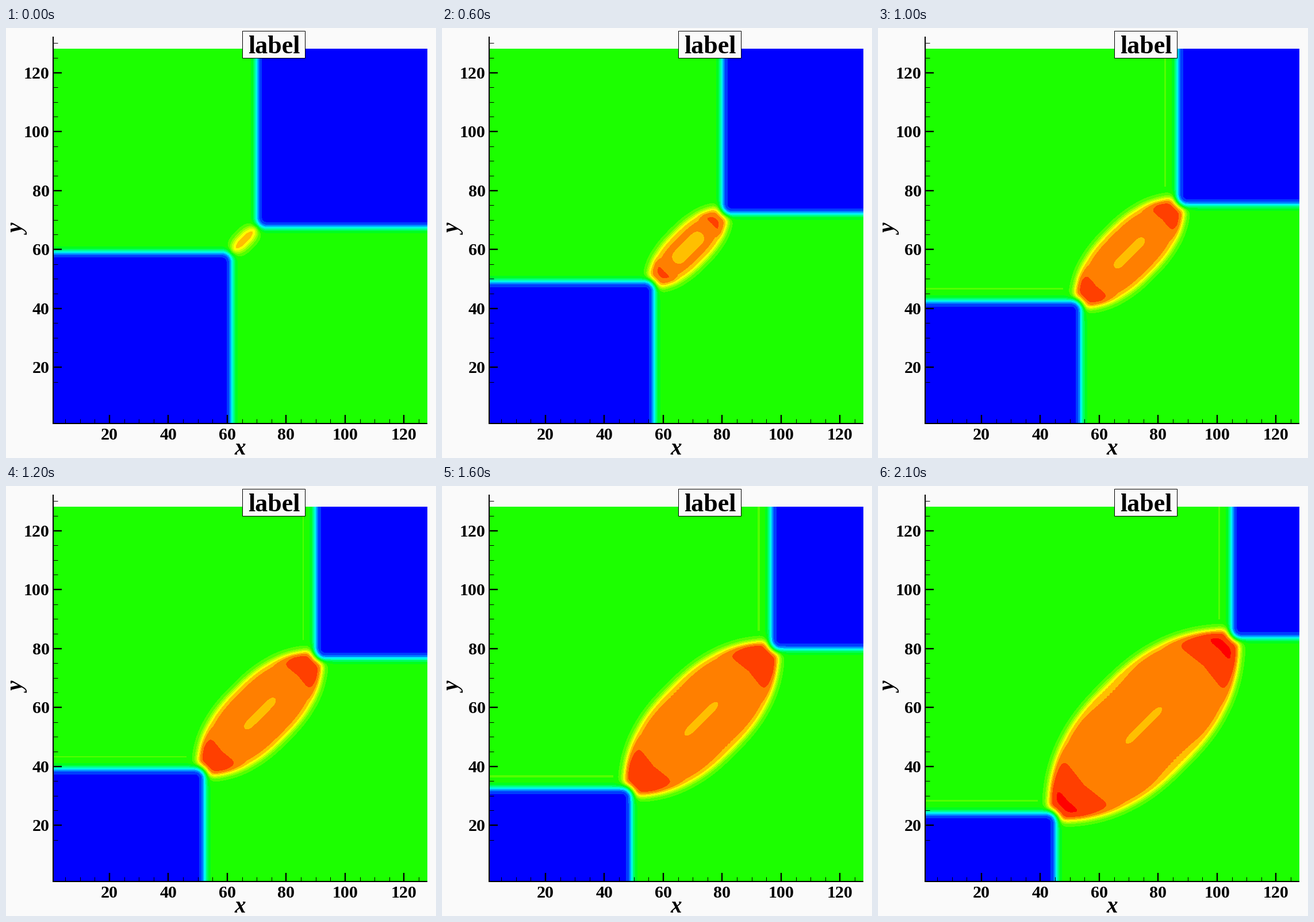
A matplotlib script that plays this animation: 748x748 px, repeating every 2.2 s.

```python
import numpy as np
import matplotlib.pyplot as plt
from matplotlib.animation import FuncAnimation
from matplotlib.colors import ListedColormap
from matplotlib.patches import Rectangle

SIZE, DPI = 748, 88
FRAMES, STEP_MS = 22, 100
LEFT, RIGHT, TOP, BOTTOM = 82, 733, 36, 688
CELL = 5.125
BANDS = 18
PAPER = "#fafafa"

X, Y = np.meshgrid(np.arange(LEFT, RIGHT) + 0.5, np.arange(TOP, BOTTOM) + 0.5)


def px(v):
    return 77.5 + CELL * v


def py(v):
    return 692.5 - CELL * v


def rainbow(n):
    """Blue, cyan, green, yellow, red in n even steps."""
    t = np.linspace(0, 1, n)
    stops = [0, 0.25, 0.5, 0.765, 1]
    return ListedColormap(np.column_stack([
        np.interp(t, stops, [0, 0, 0, 1, 1]),
        np.interp(t, stops, [0, 1, 1, 1, 0]),
        np.interp(t, stops, [1, 1, 0, 0, 0]),
    ]))


def logistic(z):
    return 0.5 * (1 + np.tanh(z / 2))


def quadrant(ex, ey, a, r=18):
    """Distance outside the rounded quadrant ex > a, ey > a."""
    qx, qy = a + r - ex, a + r - ey
    return (np.hypot(np.maximum(qx, 0), np.maximum(qy, 0))
            + np.minimum(np.maximum(qx, qy), 0) - r)


def lens(p, s, a, i):
    """Rise above the plateau inside the lens; p runs along it, s across."""
    p, s = np.asarray(p), np.asarray(s)
    p_abs, s_abs = np.abs(p), np.abs(s)
    half = 16 + 2.85 * i
    reach = a + 25 - 12 * np.exp(-i / 2)
    edge = half * (1 - (p_abs / reach) ** 2.6)
    slope = 2.6 * half / reach * (p_abs / reach) ** 1.6
    depth = (edge - s_abs) * np.sqrt(2 / (1 + slope ** 2))

    # hotter tips
    cap = max(0, 2.05 * (1 - np.exp(-i / 8)) - 0.2)
    tip = np.clip(((p_abs + 0.12 * s_abs) / a - 0.58) * 5.4, 0, cap)
    rise = (5.95 - 0.6 * np.exp(-i / 4) + tip) * logistic((depth - 10.5) / 3.9)

    # cooler streak in the middle
    width = 8.5 + 33 * np.exp(-i / 3)
    streak = np.exp(-2 * (s / width) ** 2) / (1 + (p / (20 + 0.55 * i)) ** 8)
    rise -= 0.8 * (1 - np.exp(-i / 2)) * streak

    # ragged cooler rim along the flanks
    late = np.clip((i - 14) / 7, 0, 1)
    rim = np.exp(-((depth - 22) / 7) ** 2)
    teeth = 0.15 * np.sin(2 * np.pi * p / 5) * np.exp(-(p / 15) ** 2)
    return rise - late * rim * (0.65 * np.exp(-(p / 35) ** 2) + teeth)


def ripple(along, gap, a, i):
    """Thin overshoot line running parallel to a front."""
    if i < 8:
        return np.zeros(X.shape, bool)
    if i < 10:
        half = 0.5
        dashed = (along // 12) % 3 == 0
    else:
        half = 1.2 + 1.1 * np.exp(-((i - 16) / 2) ** 2)
        dashed = True
    return (np.abs(gap - 21) <= half) & (along > a + 32) & dashed


def field(i):
    dx = X - 414.5 - 2.28 * i
    dy = Y - 368.5 - 2.28 * i
    a = 21 + 6.24 * i
    gap = np.minimum(quadrant(dx, -dy, a), quadrant(-dx, dy, a))
    rise = lens((dx - dy) / 2, (dx + dy) / 2, a, i) * logistic((gap - 6) / 3.5)
    q = 0.5 + (9 + rise) * logistic(gap / 3.5)
    lines = ripple(-dy, a - dx, a, i) | ripple(-dx, a - dy, a, i)
    q[lines] = np.maximum(q[lines], 10.5)
    return np.clip(np.floor(q), 0, BANDS - 1)


plt.rcParams["font.family"] = "Liberation Serif"
fig = plt.figure(figsize=(SIZE / DPI, SIZE / DPI), dpi=DPI, facecolor=PAPER)
ax = fig.add_axes([0, 0, 1, 1])
ax.axis("off")
image = ax.imshow(field(0), cmap=rainbow(BANDS), vmin=0, vmax=BANDS - 1,
                  extent=(LEFT, RIGHT, BOTTOM, TOP), interpolation="nearest",
                  aspect="auto")
ax.set_xlim(0, SIZE)
ax.set_ylim(SIZE, 0)


def line(xs, ys, w):
    ax.plot(xs, ys, color="black", lw=w * 72 / DPI, solid_capstyle="butt",
            zorder=3)


def text(x, y, s, size, **kw):
    ax.text(x, y, s, fontsize=size * 72 / DPI, weight="bold", zorder=5, **kw)


line([82, 82], [15, 689], 2)
line([81, 733], [688, 688], 2)
for v in range(5, 131, 5):
    major = v % 20 == 0
    length, w = (15, 2.4) if major else (8, 1)
    if v < 128:
        line([px(v)] * 2, [688, 688 - length], w)
    if v >= 15:
        line([82, 82 + length], [py(v)] * 2, w)
    if major:
        text(px(v), 716, str(v), 30, ha="center", va="baseline")
        text(76, py(v) + 10, str(v), 30, ha="right", va="baseline")

text(407, 742, "x", 39, style="italic", ha="center", va="baseline")
text(22, 350, "y", 39, style="italic", ha="center", va="center", rotation=90)
ax.add_patch(Rectangle((411.5, 4.5), 109, 47, fc=PAPER, ec="black",
                       lw=72 / DPI, zorder=4))
text(466, 44, "label", 44, ha="center", va="baseline")


def update(i):
    image.set_data(field(i))
    return [image]


anim = FuncAnimation(fig, update, frames=FRAMES, interval=STEP_MS,
                     repeat=True, repeat_delay=0)
plt.show()
```
